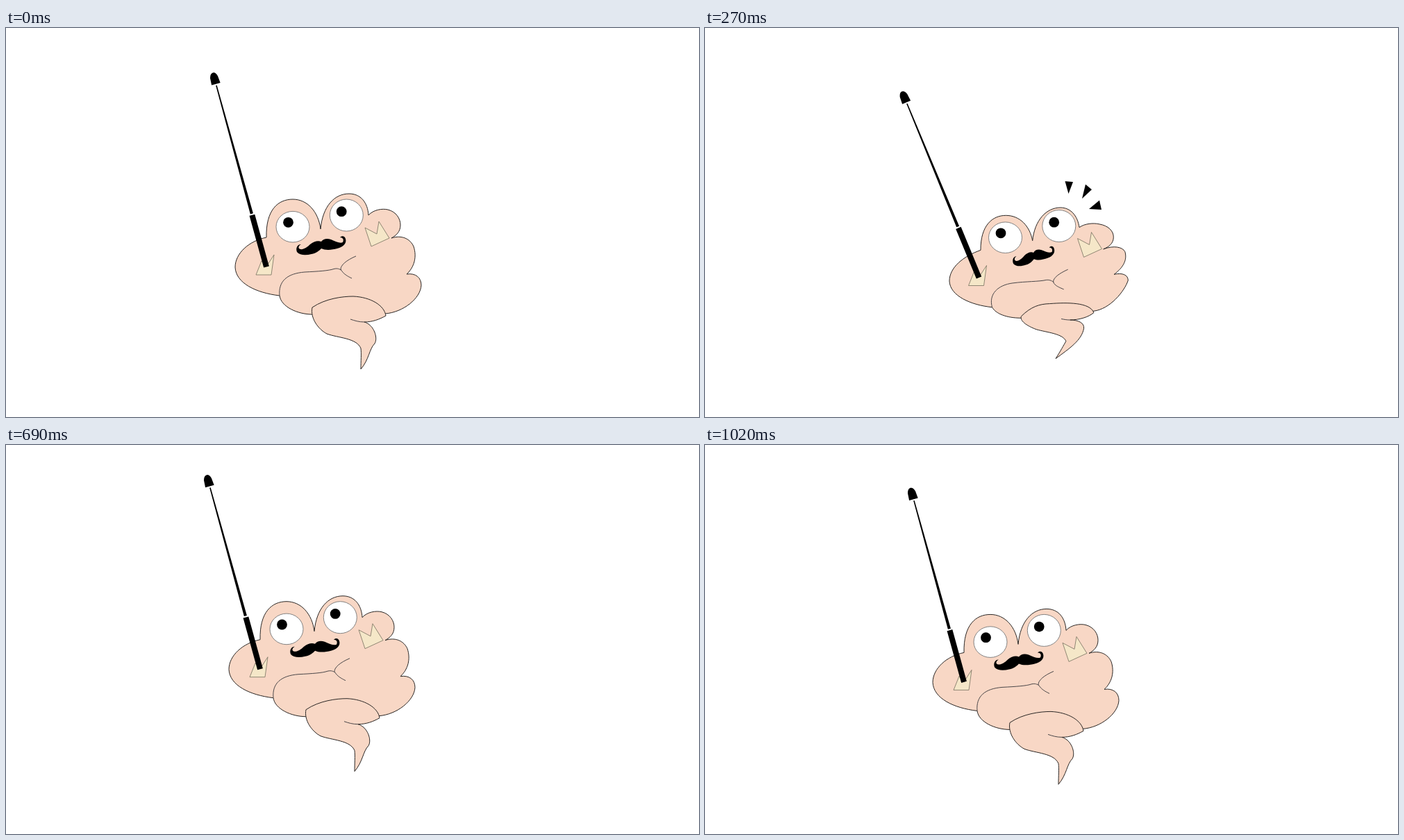
Write an HTML page that moves like this. It is 998x561 px and loops after 1080 ms.

```html
<!DOCTYPE html>
<html lang="en">
<head>
<meta charset="utf-8">
<title>Conductor</title>
<style>
  html, body { margin: 0; width: 100%; height: 100%; overflow: hidden; background: #fff; }
  svg { display: block; width: 100%; height: 100%; }
  .skin { fill: #f8d7c5; stroke: #2a2624; stroke-width: 1; stroke-linejoin: round; }
  .crease { fill: none; stroke: #4a4648; stroke-width: 1; }
  .palm { fill: #f5e7c8; stroke: #77705f; stroke-width: .8; }
  .eye { fill: #fff; stroke: #777; stroke-width: .9; }
</style>
</head>
<body>
<svg viewBox="0 0 998 561">
  <g id="figure">
    <path id="body" class="skin"/>
    <path id="fold" class="crease"/>
    <path id="thumb" class="crease"/>
    <path id="tail" class="skin"/>
    <path id="tuck" class="crease"/>
    <path class="palm" d="M517 288L534 297 537 279 552 303 526 315Z"/>
    <path class="palm" d="M360 356L368 336 375 344 386 327 382 356Z"/>
    <ellipse class="eye" cx="413" cy="286.7" rx="24" ry="22.3"/>
    <ellipse class="eye" cx="490.3" cy="270" rx="24" ry="23"/>
    <circle cx="406.5" cy="280.3" r="7.4"/>
    <circle cx="483.2" cy="264.7" r="7.4"/>
    <path id="moustache" d="M425 312C419 312 417 318 419 323C423 328 432 328 440 326C447 325 451 321 454 318C460 321 470 320 477 318C486 316 491 310 489 304C488 300 484 299 481 302C485 302 487 305 485 309C481 311 475 308 468 305C462 303 457 304 454 308C449 306 443 308 438 312C434 316 428 320 424 319C420 318 421 314 425 312Z"/>
    <path id="baton" d="M-4 0V-77.5H4V0ZM-2.1 -79.5L-.8 -271.5H.8L2.1 -79.5ZM-6.5 -273.5L-5.8 -284Q-4 -290.5 0 -290.5Q4 -290.5 5.6 -284L6.5 -273.5Z"/>
  </g>
  <path id="sparks" d="M518.5 221L530 222 523.5 239ZM548 225.5L557 233 543 246ZM568 248.5L571 262 553 261Z"/>
</svg>
<script>
const LOOP = 1080;
const SQUASH_SHIFT = [18, 16.5];
const $ = id => document.getElementById(id);

// Each part: relaxed outline, then squashed outline
const shapes = {
  body: [
    'M375 302C374 262 392 247 413 247C434 247 450 265 453 290C456 257 473 239 494 239C511 239 521 252 522 270C529 262 542 260 550 262C562 265 568 275 568 284C568 294 562 299 555 303C570 298 582 304 587 315C592 330 588 345 577 355C590 353 598 360 598 371C597 390 572 410 546 412L441 413C420 413 396 402 394 386C360 382 331 368 330 345C330 325 350 307 375 302Z',
    'M396 322C396 287 413 273 432 273C452 273 466 288 470 308C473 279 490 261 510 261C524 261 534 272 537 289C545 284 557 283 566 285C579 287 587 294 587 303C587 312 580 317 572 320C587 314 600 316 603 322C606 333 600 343 586 353C598 350 606 353 606 360C600 375 580 402 557 405L452 417C432 417 418 412 412 404C382 401 352 388 351 367C351 348 370 332 396 322Z'
  ],
  fold: [
    'M394 386C392 365 405 354 430 352C450 351 465 350 472 347.5C478 346 480 348 483 349',
    'M412 404C406 385 420 372 440 369C460 366 478 367 490 364.5C496 364 499 367 501 368'
  ],
  thumb: [
    'M504 329C490 335 482 342 482 348C486 355 492 358 498 361',
    'M521 350C508 356 500 362 500 368C502 373 508 375 515 378'
  ],
  tail: [
    'M441 403C460 390 485 387 500 387C525 388 545 400 547 415C538 420 528 424 516 424C530 428 536 447 531 455C523 463 523 478 511 492C511 480 512 470 511 462C505 447 478 447 462 441C449 434 438 418 441 403Z',
    'M453 416C466 402 475 398 490 397.5C515 395 550 392 557 407C550 414 535 418 522 418C533 417 543 418 543 426C541 445 520 456 498 471C506 461 512 452 516 447C512 437 490 435 475 431C460 426 450 420 453 416Z'
  ],
  tuck: [
    'M516 424C508 424 502 422 496 420',
    'M522 418C518 418 515 417.5 511 417'
  ]
};

// time, x, y, squash, swing
const keys = [
  [0, 0, 0, 0, 0],
  [180, 18, 16.5, 1, 1],
  [270, 19.5, 15.5, .82, .8],
  [450, 7, -2.2, .27, .83],
  [510, 1.5, -9, .13, .83],
  [570, -3.5, -14.5, .04, .3],
  [690, -9, -21.3, 0, 0],
  [900, -6.6, -13.2, 0, 0],
  [1020, -2, -2.6, 0, 0]
];

const key = i => keys[(i + keys.length) % keys.length];
const span = i => (key(i + 1)[0] - key(i)[0] + LOOP) % LOOP;
const slope = (i, c) => (key(i + 1)[c] - key(i)[c]) / span(i);

function tangent(i, c) {
  const a = slope(i - 1, c), b = slope(i, c);
  return a * b > 0 ? 2 * a * b / (a + b) : 0;
}

// Smooth curve through the keys without overshoot
function sample(t, c) {
  const i = keys.findLastIndex(k => k[0] <= t);
  const h = span(i), u = (t - key(i)[0]) / h, v = 1 - u;
  return v * v * (1 + 2 * u) * key(i)[c] + u * u * (3 - 2 * u) * key(i + 1)[c]
    + h * u * v * (v * tangent(i, c) - u * tangent(i + 1, c));
}

function morph([a, b], m) {
  const target = b.match(/[\d.]+/g);
  let i = 0;
  return a.replace(/[\d.]+/g, n => {
    const end = target[i] - SQUASH_SHIFT[i++ % 2];
    return (+n + (end - n) * m).toFixed(2);
  });
}

// Poses are held for 60 ms, with two short holds of 30 ms
function hold(t) {
  const offset = t >= 270 && t < 720 ? 30 : 0;
  return Math.floor((t - offset) / 60) * 60 + offset;
}

function draw(t) {
  const [x, y, squash, swing] = [1, 2, 3, 4].map(c => sample(t, c));
  $('figure').setAttribute('transform', `translate(${x} ${y})`);
  for (const id in shapes) $(id).setAttribute('d', morph(shapes[id], squash));
  $('baton').setAttribute('transform', `translate(375 344.5) rotate(${-15.4 - 8.8 * swing})`);
  $('moustache').setAttribute('transform',
    `translate(453.7 314) rotate(${-5 * swing}) scale(${1 - .18 * swing} ${1 - .08 * swing}) translate(-453.7 -314)`);
  $('sparks').setAttribute('visibility', t >= 270 && t < 390 ? 'visible' : 'hidden');
}

const start = performance.now();
function tick() {
  draw(hold((performance.now() - start) % LOOP));
  requestAnimationFrame(tick);
}
tick();
</script>
</body>
</html>
```
